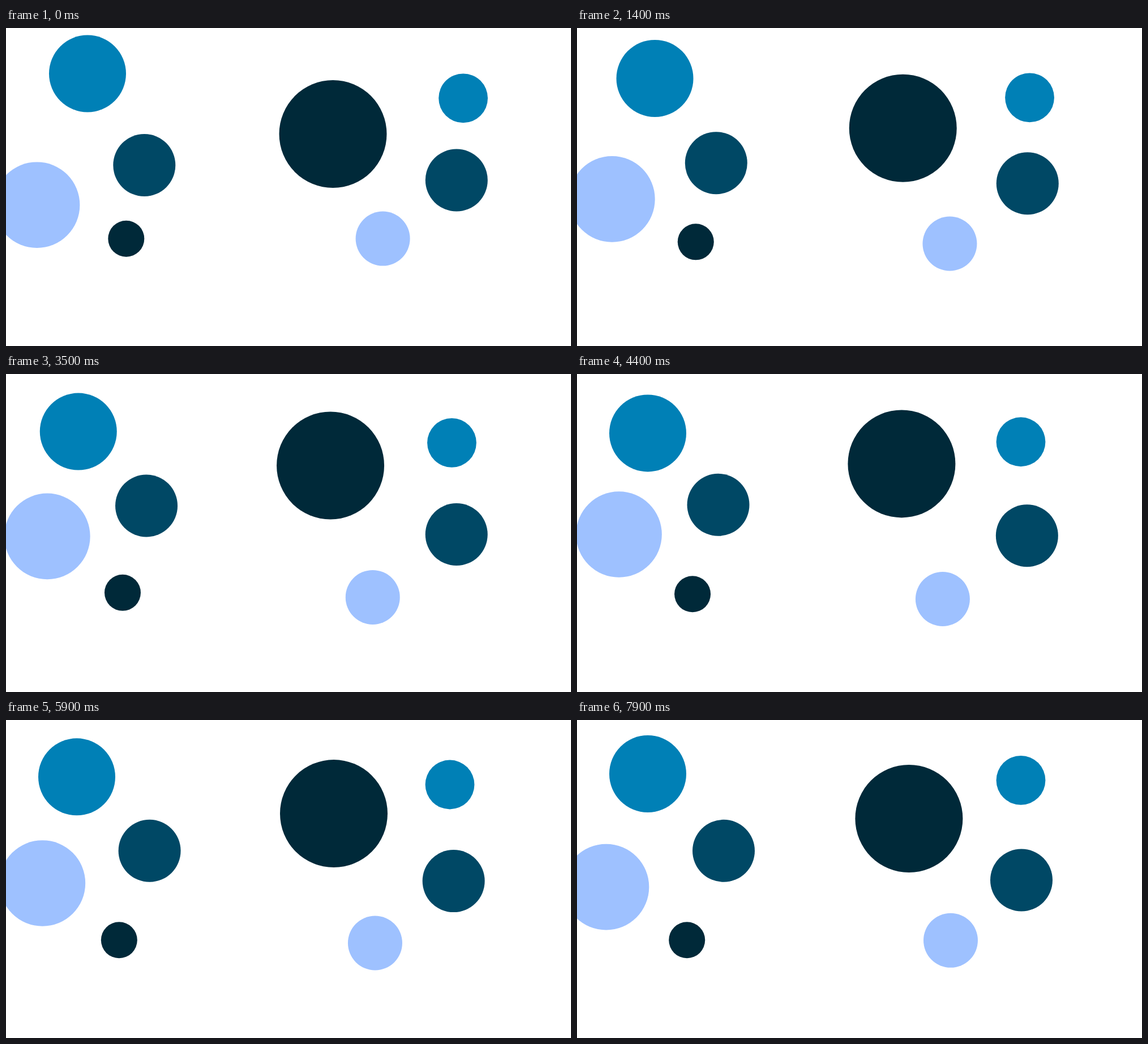
Write an HTML page that moves like this. It is 998 px wide and 561 px high and loops after 8000 ms.

```html
<!DOCTYPE html>
<html lang="en">
<head>
<meta charset="utf-8">
<title>Drifting circles</title>
<style>
html, body { margin: 0; width: 100%; height: 100%; overflow: hidden; background: #fff; }
svg { display: block; width: 998px; height: 561px; }
</style>
</head>
<body>
<svg id="stage" viewBox="0 0 998 561"></svg>
<script>
const LOOP = 8000, STEP = 100, TURN = 4100, END = 7900;
const BLUE = '#0080b6', NAVY = '#002939', TEAL = '#004865', SKY = '#9ec1ff';

// Each circle drifts in a straight line to its turning point, then on to its end point.
const circles = [
  { r: 68, fill: BLUE, path: [[144, 80.5], [125, 105.2], [125, 95]] },
  { r: 95, fill: NAVY, path: [[577.5, 187], [572.3, 157.1], [586.4, 174]] },
  { r: 43.4, fill: BLUE, path: [[807.6, 123.8], [784, 120.9], [784, 106.3]] },
  { r: 75.8, fill: SKY, path: [[54.6, 312.2], [76, 282], [51.5, 294.6]] },
  { r: 55, fill: TEAL, path: [[244.3, 242], [248.7, 230.8], [259, 230.8]] },
  { r: 32, fill: NAVY, path: [[212.3, 371.7], [204.9, 388.3], [194.2, 388.3]] },
  { r: 55, fill: TEAL, path: [[795.8, 268.5], [795.7, 285.5], [785, 282.5]] },
  { r: 48, fill: SKY, path: [[665.6, 371.6], [644.7, 397.7], [660, 388.8]] }
];

const stage = document.getElementById('stage');
for (const c of circles) {
  c.el = document.createElementNS('http://www.w3.org/2000/svg', 'circle');
  c.el.setAttribute('r', c.r);
  c.el.setAttribute('fill', c.fill);
  stage.append(c.el);
}

function draw(t) {
  const leg = t < TURN ? 0 : 1;
  const k = leg ? (t - TURN) / (END - TURN) : t / TURN;
  for (const { el, path } of circles) {
    const [a, b] = [path[leg], path[leg + 1]];
    el.setAttribute('cx', a[0] + (b[0] - a[0]) * k);
    el.setAttribute('cy', a[1] + (b[1] - a[1]) * k);
  }
}

const start = performance.now();
function tick() {
  const t = (performance.now() - start) % LOOP;
  draw(Math.floor(t / STEP) * STEP);
  requestAnimationFrame(tick);
}
tick();
</script>
</body>
</html>
```
